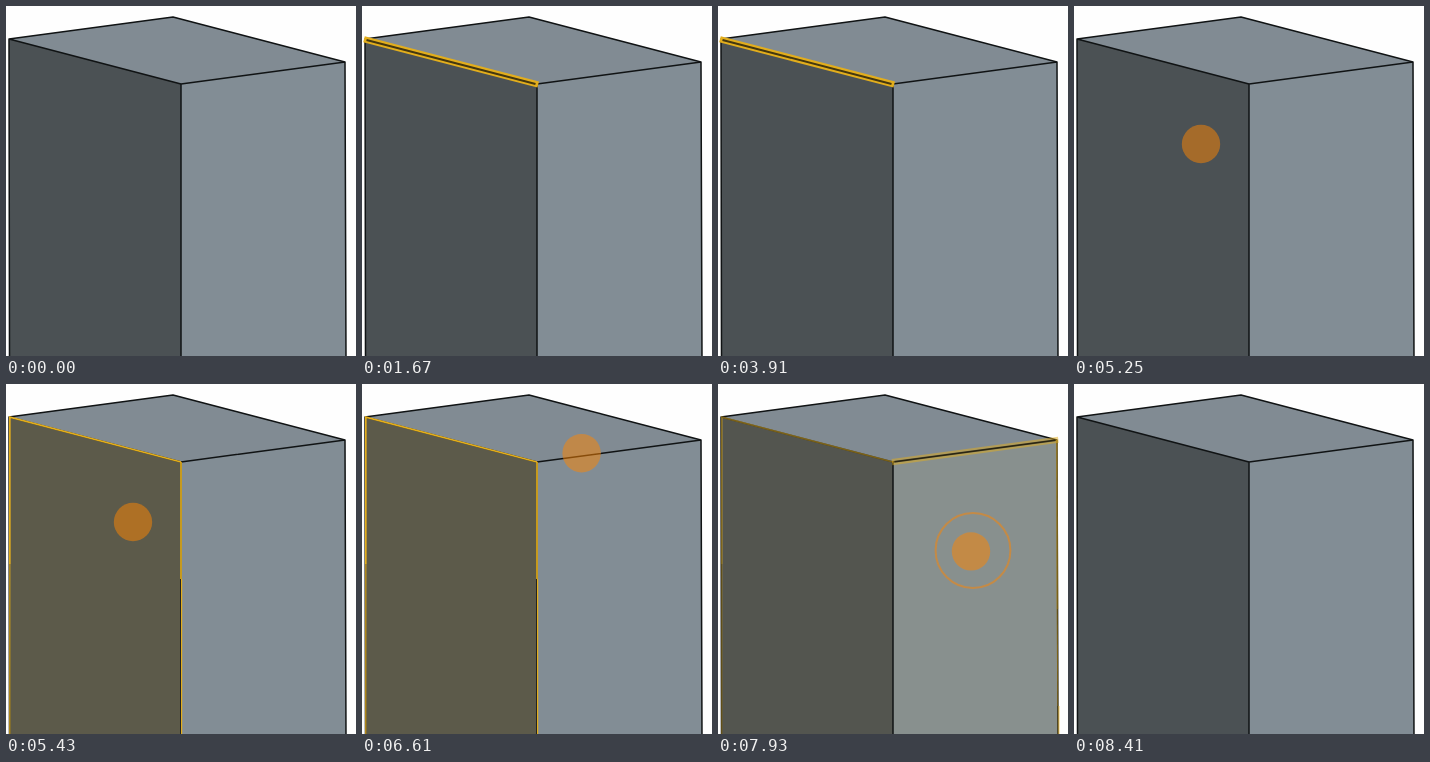
An HTML page that plays this animation: 350 by 350 pixels, repeating every 8.84 s.

```html
<!DOCTYPE html>
<html lang="en">
<head>
<meta charset="utf-8">
<title>Selecting edges and faces</title>
<style>
html, body { margin: 0; width: 100%; height: 100%; overflow: hidden; background: #fefefe; }
svg { display: block; width: 100vw; height: 100vh; }
.line { fill: none; stroke: #101314; stroke-width: 1.5; stroke-linejoin: round; }
.gold { fill: none; stroke: #e3ae1c; }
.core { fill: none; stroke: #44370f; stroke-width: 2; }
.glow { stroke-width: 6.2; stroke-linecap: butt; }
</style>
</head>
<body>
<svg viewBox="0 0 350 350">
  <path fill="#818b93" d="M3 33L167 11L339 56L175 78Z"/>
  <path fill="#4b5154" d="M3 33L175 78V352H3.5Z"/>
  <path fill="#828d95" d="M175 78L339 56L340 352H175Z"/>
  <path id="leftTint" fill="#5c5a4a" d="M3 33L175 78V352H3.5Z"/>
  <path id="rightTint" fill="#909388" d="M175 78L339 56L340 352H175Z"/>

  <path class="line" d="M3.5 352L3 33L167 11L339 56L340 352M3 33L175 78L339 56M175 78V352"/>

  <g id="leftRim" class="gold">
    <path stroke-width="1.7" d="M3.8 180V33.2L175 78"/>
    <path stroke-width="1.1" d="M3.8 180V352"/>
    <g id="leftSeam">
      <path stroke-width="1.7" d="M175 78V195"/>
      <path stroke-width="1.2" d="M175.6 195V352"/>
    </g>
  </g>
  <g id="rightRim">
    <path class="gold" stroke-width="1.8" d="M338.8 56L339.4 225"/>
    <path class="gold" stroke-width="1.1" d="M339.2 225L339.8 322"/>
    <path class="gold" stroke-width="2" d="M340.6 322V352"/>
  </g>

  <g id="leftEdge">
    <path class="gold glow" d="M2 33.2L176.2 78.6"/>
    <path class="core" d="M4.5 34L173.5 78"/>
  </g>
  <g id="rightEdge">
    <path class="gold glow" d="M174 78.1L340.4 55.8"/>
    <path class="core" d="M176.5 77.8L337.5 56.2"/>
  </g>

  <circle id="dot" r="19.2" fill="#ff8500" fill-opacity=".5"/>
  <circle id="ring" cx="255" cy="166.5" r="37.4" fill="none" stroke="#ff8500" stroke-opacity=".5" stroke-width="2"/>
</svg>
<script>
const LOOP = 8840;

// [start, end, x, y]
const taps = [
  [1070, 1670, 93, 57],
  [2160, 2760, 214.7, 74.6],
  [3310, 3910, 212, 68],
  [4270, 4880, 126.6, 73.5],
  [5250, 5860, 127, 138],
  [6610, 7220, 219.6, 69.2],
  [7450, 8410, 253, 167.4]
];

// [time, opacity], each value held until the next
const leftFace = [[5430, 1], [7930, .5], [8050, 0]];
const rightFace = [[7760, .4], [7820, .8], [7880, 1], [7930, .5], [8050, 0]];
const tracks = {
  leftEdge: [[1300, .6], [1360, 1], [4450, 0]],
  rightEdge: [[2460, .6], [2520, 1], [3550, 0], [6980, 1], [7930, .5], [8050, 0]],
  leftTint: leftFace,
  leftRim: leftFace,
  leftSeam: [[5430, 1], [7760, 0]],
  rightTint: rightFace,
  rightRim: rightFace,
  ring: [[7930, 1], [8410, 0]]
};

const el = id => document.getElementById(id);
const valueAt = (steps, t) => steps.reduce((v, [at, next]) => t >= at ? next : v, 0);

function draw(now) {
  const t = now % LOOP;
  for (const id in tracks) el(id).style.opacity = valueAt(tracks[id], t);

  const tap = taps.find(([start, end]) => t >= start && t < end);
  const dot = el("dot");
  dot.style.opacity = tap ? 1 : 0;
  if (tap) {
    dot.setAttribute("cx", tap[2]);
    dot.setAttribute("cy", tap[3]);
  }
}

const begin = performance.now();
function tick() {
  draw(performance.now() - begin);
  requestAnimationFrame(tick);
}
tick();
</script>
</body>
</html>
```
